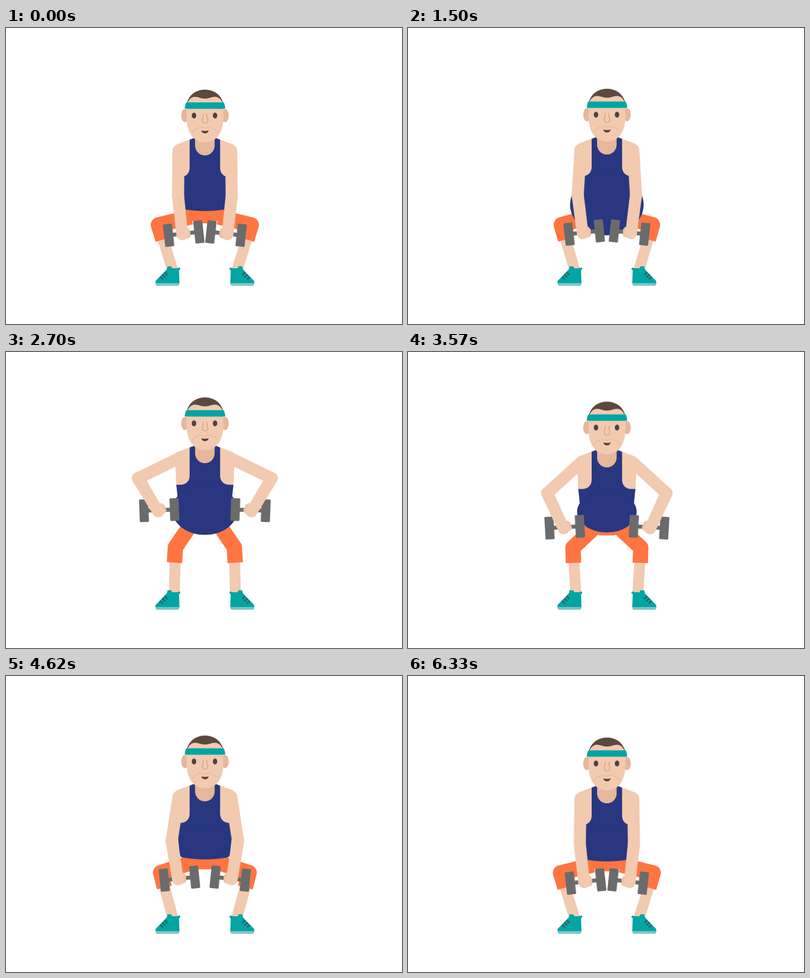
Recreate the animation shown at these times as an HTML page without scripts. Size 800 by 600 pixels, loop 6.36 s.

```html
<!DOCTYPE html>
<html lang="en">
<head>
<meta charset="utf-8">
<title>Squats with dumbbells</title>
<style>
  html, body { margin: 0; width: 100%; height: 100%; overflow: hidden; background: #fff; }
  svg { display: block; width: 800px; height: 600px; }

  :root {
    --skin: #f1cab0;
    --shade: #e6b79a;
    --blue: #283780;
    --orange: #ff7542;
    --teal: #00a5a4;
    --iron: #6b6b6b;
    --swing: cubic-bezier(.364, 0, .636, 1);
  }

  .skin { fill: var(--skin); }
  .shade { fill: var(--shade); }
  .blue { fill: var(--blue); }
  .orange { fill: var(--orange); }
  .teal { fill: var(--teal); }
  .dark { fill: #4f423e; }
  .iron { fill: var(--iron); }
  .limb { fill: none; stroke: var(--skin); stroke-width: 24.5; stroke-linecap: round; }

  /* Four squats per loop; the first one rises a little higher */
  .body { animation: rise 6360ms var(--swing) infinite; }
  @keyframes rise {
    0%, 25%, 50%, 75%, 100% { transform: translateY(125px); }
    12.5% { transform: translateY(67.5px); }
    37.5%, 62.5%, 87.5% { transform: translateY(75px); }
  }

  .shin {
    fill: none; stroke: var(--skin); stroke-width: 22;
    animation: shin 6360ms var(--swing) infinite;
  }
  @keyframes shin {
    0%, 25%, 50%, 75%, 100% { d: path("M308 399L336.5 490"); }
    12.5% { d: path("M362 393L342.5 490"); }
    37.5%, 62.5%, 87.5% { d: path("M360 394L342 490"); }
  }

  .thigh {
    fill: none; stroke: var(--orange); stroke-width: 31; stroke-linejoin: round;
    animation: thigh 6360ms var(--swing) infinite;
  }
  @keyframes thigh {
    0%, 25%, 50%, 75%, 100% { d: path("M374 383L308 399L317 429"); }
    12.5% { d: path("M373 325L362 393L354 426"); }
    37.5%, 62.5%, 87.5% { d: path("M373 333L360 394L352.5 426"); }
  }

  /* One squat lasts 1590ms, a quarter of the loop */
  .upper, .fore, .bell { animation: 1590ms var(--swing) infinite; }
  .upper { animation-name: upper; }
  .fore { animation-name: fore; }
  .bell { animation-name: bell; }
  @keyframes upper { 0%, 100% { transform: rotate(.6deg); } 50% { transform: rotate(97deg); } }
  @keyframes fore { 0%, 100% { transform: rotate(-6.9deg); } 50% { transform: rotate(-141.3deg); } }
  @keyframes bell { 0%, 100% { transform: rotate(0deg); } 50% { transform: rotate(44.3deg); } }

  /* The belly swells during the first squat, then is worked off */
  .belly { animation: belly 6360ms linear infinite; }
  @keyframes belly {
    0% { rx: 46px; ry: 28px; cy: 212px; animation-timing-function: ease-in-out; }
    22% { rx: 75px; ry: 63px; cy: 235.5px; }
    72.6%, 100% { rx: 53px; ry: 32px; cy: 217px; }
  }
  .hem { animation: hem 6360ms ease-in-out infinite; }
  @keyframes hem {
    0% { transform: translateY(-5px); }
    22%, 100% { transform: translateY(0); }
  }
</style>
</head>
<body>
<svg viewBox="0 0 800 600" xmlns="http://www.w3.org/2000/svg">
  <!-- Only still parts are reused, so that every moving part shares one clock -->
  <defs>
    <g id="shoe">
      <path class="teal" d="M302 518V513L325 489L326.500 483H334L335.500 487H345L350 485.500Q352.500 486 352 489L349.500 491L350.500 518Z"/>
      <path d="M302 517H350.500V518Q350 522.500 346 522.500H306Q302 522.500 302 518Z" fill="#7dc3c4"/>
      <path d="M311 504.500L317 509.500M315.500 499.500L322 505.500M320.500 495L326 500.500" stroke="#2b6468" stroke-width="3.200" fill="none"/>
    </g>
    <g id="dumbbell" class="iron">
      <rect x="-30" y="-4" width="60" height="8"/>
      <rect x="-40" y="-23" width="18.500" height="46" rx="2"/>
      <rect x="21.500" y="-23" width="18.500" height="46" rx="2"/>
    </g>
    <g id="forearm">
      <path d="M8 68L13 67L17 73L15.500 86L8 89Z" fill="#edc3a7"/>
      <path class="skin" d="M-12.250 0A12.250 12.250 0 0 1 12.250 0L11.500 70L12 81A12.250 12.250 0 0 1 -12 81Z"/>
    </g>
  </defs>

  <g>
    <path class="shin" d="M308 399L336.500 490"/>
    <use href="#shoe"/>
    <path class="thigh" d="M374 383L308 399L317 429"/>
  </g>
  <g transform="translate(803.500 0) scale(-1 1)">
    <path class="shin" d="M308 399L336.500 490"/>
    <use href="#shoe"/>
    <path class="thigh" d="M374 383L308 399L317 429"/>
  </g>

  <g class="body">
    <path class="orange" d="M356 240H447.500L445 258L417 271H386.500L358.500 258Z"/>

    <path class="skin" d="M382 97L345 111L341 115L344 178H459.500L462.500 115L458.500 111L421.500 97Z"/>
    <rect class="shade" x="380" y="90" width="43" height="46"/>
    <path class="blue" d="M371 101.500L382 97V113.500A19.750 19.750 0 0 0 421.500 113.500V97L432.500 101.500V158C432.500 170 440 177 452 177H459.500L456.500 205H347L344 177H351.500C363.500 177 371 170 371 158Z"/>
    <path class="blue hem" d="M346.500 200H457L452.500 240Q452 246 447 247Q401.750 255 356.500 247Q351.500 246 351 240Z"/>
    <ellipse class="blue belly" cx="401.750" cy="212" rx="46" ry="28"/>

    <g class="head">
      <ellipse class="shade" cx="361.500" cy="52.500" rx="7.500" ry="13.500"/>
      <ellipse class="shade" cx="442.500" cy="52.500" rx="7.500" ry="13.500"/>
      <path d="M364.500 30C369 10 384 0 402 0S435 10 439.500 30Z" fill="#5b483f"/>
      <path class="skin" d="M365 30Q370 16 380 14.500C388 14 393 18 402 18S416 14 424 14.500Q434 16 439 30V58C439 88 424 107 402 107S365 88 365 58Z"/>
      <path class="teal" d="M366 25.700H438Q440.500 25.700 441 28L443 36.500Q443 38.800 440.500 38.800H363.500Q361 38.800 361 36.500L363 28Q363.500 25.700 366 25.700Z"/>
      <ellipse class="dark" cx="379.800" cy="52.500" rx="4.500" ry="6"/>
      <ellipse class="dark" cx="422.300" cy="52.500" rx="4.500" ry="6"/>
      <path d="M398.500 49C398.500 56 396.500 60 396.500 63Q397 68 402 68T407.500 63C407.500 60 405.500 56 405.500 49" fill="none" stroke="#dba88b" stroke-width="2"/>
      <path d="M376.500 86Q384 77 395 76.500Q399 76.500 402 78.500Q405 76.500 409 76.500Q420 77 427.500 86" fill="none" stroke="#d3a488" stroke-width="1.600" stroke-dasharray="1.600 2.600"/>
      <path d="M394.500 82.500Q402 85 409.500 82.500Q408 88.500 402 88.500T394.500 82.500Z" fill="#5f3a33"/>
    </g>

    <g transform="translate(348.500 124)">
      <g class="upper">
        <path class="limb" d="M0 0V91"/>
        <g transform="translate(0 91)">
          <g class="fore">
            <g transform="translate(3 77.500)"><g class="bell"><use href="#dumbbell"/></g></g>
            <use href="#forearm"/>
          </g>
        </g>
      </g>
    </g>
    <g transform="translate(455 124) scale(-1 1)">
      <g class="upper">
        <path class="limb" d="M0 0V91"/>
        <g transform="translate(0 91)">
          <g class="fore">
            <g transform="translate(3 77.500)"><g class="bell"><use href="#dumbbell"/></g></g>
            <use href="#forearm"/>
          </g>
        </g>
      </g>
    </g>
  </g>
</svg>
</body>
</html>
```
